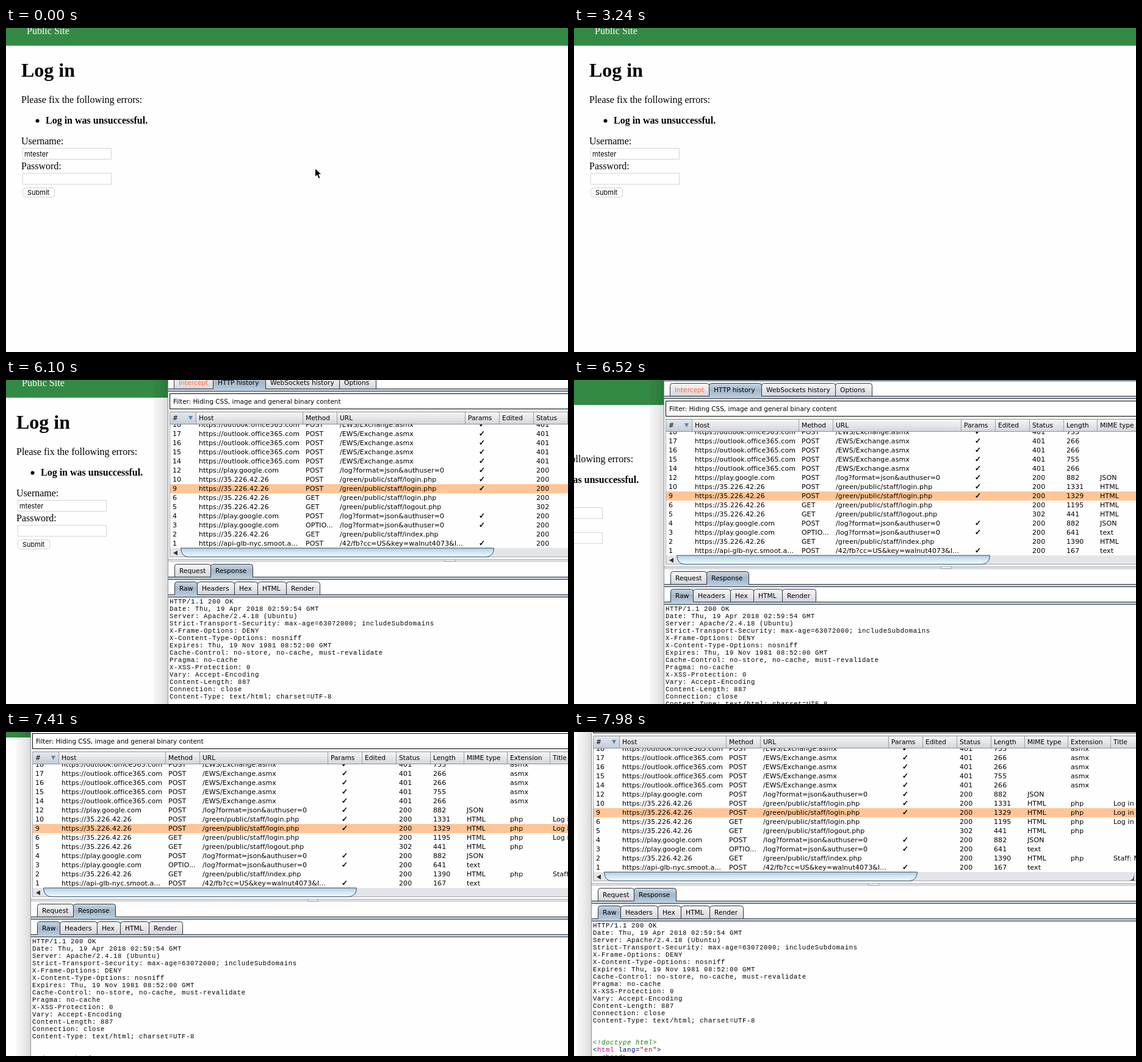
Animation of 921x532 px, one loop 8 s. Source, as an HTML page:

```html
<!DOCTYPE html>
<html lang="en">
<head>
<meta charset="utf-8">
<title>Log in</title>
<style>
  html, body { margin: 0; width: 100%; height: 100%; overflow: hidden; background: #fefefe; }
  svg { display: block; width: 921px; height: 532px; }
  text { white-space: pre; }
  .page { font: 16px "Liberation Serif", serif; }
  .bold { font-weight: bold; }
  .title { font-size: 32px; font-weight: bold; }
  .field { font: 11px Inter, sans-serif; }
  .label { font: 10.7px "DejaVu Sans", sans-serif; }
  .filter { font: 10.45px "DejaVu Sans", sans-serif; }
  .cell { font: 11px "DejaVu Sans", sans-serif; letter-spacing: .1px; }
  .check { font: 12px "DejaVu Sans", sans-serif; stroke: #000; stroke-width: .6px; }
  .code { font: 10.6px "Liberation Mono", monospace; letter-spacing: .64px; }
</style>
</head>
<body>
<svg viewBox="0 0 921 532">
  <defs>
    <linearGradient id="plain" x2="0" y2="1"><stop stop-color="#f7f7f8"/><stop offset="1" stop-color="#d3d5d9"/></linearGradient>
    <linearGradient id="active" x2="0" y2="1"><stop stop-color="#c9d6e2"/><stop offset=".5" stop-color="#a3b7ca"/><stop offset="1" stop-color="#b5c9db"/></linearGradient>
    <linearGradient id="thumb" x2="0" y2="1"><stop stop-color="#b3cde2"/><stop offset=".5" stop-color="#d5e7f5"/><stop offset="1" stop-color="#eefaff"/></linearGradient>
    <linearGradient id="shade"><stop stop-opacity=".03"/><stop offset=".5" stop-opacity=".07"/><stop offset="1" stop-opacity=".14"/></linearGradient>
    <clipPath id="rowArea"><rect x="276" y="73" width="1000" height="203"/></clipPath>
  </defs>
  <g id="world">
    <g id="page"></g>
    <g id="panel"></g>
  </g>
  <path id="cursor" d="M.5.5V14.6L3.8 11.6L6.3 17.3L9 16.1L6.5 10.6H11.2Z" stroke="#fff"/>
</svg>
<script>
const $ = id => document.getElementById(id);
const esc = s => String(s).replace(/&/g, "&amp;").replace(/</g, "&lt;");
const text = (x, y, s, cls, fill = "#000") => `<text x="${x}" y="${y}" class="${cls}" fill="${fill}">${esc(s)}</text>`;
const rect = (x, y, w, h, fill, more = "") => `<rect x="${x}" y="${y}" width="${w}" height="${h}" fill="${fill}" ${more}/>`;
const box = (x, y, w, h, fill, stroke, r = 0) => rect(x + .5, y + .5, w - 1, h - 1, fill, `stroke="${stroke}" rx="${r}"`);

$("page").innerHTML =
  rect(-10, -60, 1300, 89, "#338a45") +
  text(34, 10, "Public Site", "page", "#fff") +
  text(25, 80, "Log in", "page title") +
  text(25, 123, "Please fix the following errors:", "page") +
  `<circle cx="51.5" cy="152.5" r="3"/>` +
  text(65, 157, "Log in was unsuccessful.", "page bold") +
  text(25, 191, "Username:", "page") +
  box(27, 197, 146, 19, "#fff", "#d4d4d4") +
  text(30, 211, "mtester", "field") +
  text(25, 232, "Password:", "page") +
  box(27, 238, 146, 19, "#fff", "#d4d4d4") +
  box(27, 262, 53, 16, "#fff", "#d2d2d2", 3.5) +
  text(35, 274, "Submit", "field");

// Tabs: names, their edges, the top edge and the index of the open tab
function tabBar(names, edges, top, open) {
  const bottom = top + 22;
  const tabs = names.map((name, i) => {
    const l = edges[i] + .5, r = edges[i + 1] + .5, t = top + .5;
    const fill = i === open ? "url(#active)" : "url(#plain)";
    return `<path d="M${l} ${bottom}V${t + 4}Q${l} ${t} ${l + 4} ${t}H${r - 4}Q${r} ${t} ${r} ${t + 4}V${bottom}Z" fill="${fill}" stroke="#30343a"/>` +
      text(l + 7.5, top + 15, name, "label", name === "Intercept" ? "#ff6633" : "#000");
  });
  return tabs.join("") + strip(bottom - 1) +
    rect(edges[open] + 1, bottom - 1, edges[open + 1] - edges[open] - 1, 2, "#b5c9db");
}
const strip = y => rect(274, y, 1000, 5, "#bdd0e2") + rect(274, y, 1000, 1, "#30343a") + rect(274, y + 4, 1000, 1, "#30343a");

const columns = [["#", 281], ["Host", 324], ["Method", 499], ["URL", 555], ["Params", 765], ["Edited", 821],
  ["Status", 877], ["Length", 933], ["MIME type", 988], ["Extension", 1059], ["Title", 1129]];

const mail = "https://outlook.office365.com", play = "https://play.google.com", site = "https://35.226.42.26";
const exchange = "/EWS/Exchange.asmx", log = "/log?format=json&authuser=0", staff = "/green/public/staff/";
const mailRow = (n, length) => [n, mail, "POST", exchange, "✓", "", 401, length, "", "asmx"];
const siteRow = (n, method, file, check, status, length, title) =>
  [n, site, method, staff + file, check, "", status, length, "HTML", "php", title];
const rows = [
  mailRow(18, 755), mailRow(17, 266), mailRow(16, 266), mailRow(15, 755), mailRow(14, 266),
  [12, play, "POST", log, "✓", "", 200, 882, "JSON"],
  siteRow(10, "POST", "login.php", "✓", 200, 1331, "Log in"),
  siteRow(9, "POST", "login.php", "✓", 200, 1329, "Log in"),
  siteRow(6, "GET", "login.php", "", 200, 1195, "Log in"),
  siteRow(5, "GET", "logout.php", "", 302, 441),
  [4, play, "POST", log, "✓", "", 200, 882, "JSON"],
  [3, play, "OPTIO...", log, "✓", "", 200, 641, "text"],
  siteRow(2, "GET", "index.php", "", 200, 1390, "Staff: Menu"),
  [1, "https://api-glb-nyc.smoot.a...", "POST", "/42/fb?cc=US&key=walnut4073&l...", "✓", "", 200, 167, "text"],
];

function table() {
  let out = rect(276, 52, 1000, 21, "url(#plain)") + rect(276, 52, 1000, 1, "#8c9096") + rect(276, 72, 1000, 1, "#8c9096") +
    rect(276, 52, 1, 239, "#9a9ea4") + rect(277, 53, 42, 19, "#5c86b0", 'opacity=".12"') +
    `<path d="M307 59H314L310.500 66Z" fill="#5b86b3"/>`;
  columns.forEach(([name, x], i) => {
    out += text(x, 66, name, "label");
    if (i) out += rect(x - 5, 53, 1, 19, "#9a9ea4");
  });
  out += `<g clip-path="url(#rowArea)">` + rect(277, 171, 1000, 15, "#ffc596");
  rows.forEach((row, r) => row.forEach((value, c) => {
    const y = 77 + r * 15;
    if (value) out += value === "✓" ? text(783, y, value, "check") : text(columns[c][1], y, value, "cell");
  }));
  return out + `</g><g id="focus">${box(319, 171, 175, 15, "none", "#b98f6e")}</g>`;
}

const scrollBar = () =>
  rect(277, 276, 1000, 15, "#e3e5e8") + rect(277, 290, 1000, 1, "#a4a8ad") +
  `<path d="M289 280V288L282 284Z" fill="#333"/>
   <path d="M294.500 276Q295 290.500 308 290.500H795Q807.500 289 807.500 276Z" fill="url(#thumb)" stroke="#2f4f6c"/>
   <path d="M1156 290Q1163 288 1163 277V290Z" fill="#555"/>`;

const response = `HTTP/1.1 200 OK
Date: Thu, 19 Apr 2018 02:59:54 GMT
Server: Apache/2.4.18 (Ubuntu)
Strict-Transport-Security: max-age=63072000; includeSubdomains
X-Frame-Options: DENY
X-Content-Type-Options: nosniff
Expires: Thu, 19 Nov 1981 08:52:00 GMT
Cache-Control: no-store, no-cache, must-revalidate
Pragma: no-cache
X-XSS-Protection: 0
Vary: Accept-Encoding
Content-Length: 887
Connection: close
Content-Type: text/html; charset=UTF-8`.split("\n");

const span = (s, style) => `<tspan style="${style}">${esc(s)}</tspan>`;
const tag = name => span("<", "fill:#0000a0") + span(name, "fill:#c000a0");
const markup = [
  span("<!doctype html>", "fill:#008a00;font-style:italic"),
  tag("html") + span(" lang", "fill:#0000a0") + "=" + span('"en"', "fill:#c00000") + span(">", "fill:#0000a0"),
  "  " + tag("head") + span(">", "fill:#0000a0"),
];

$("panel").innerHTML =
  rect(250, -60, 23, 700, "url(#shade)") +
  rect(273, -60, 1000, 700, "#fefefe") + rect(273, -60, 1, 700, "#8b8f94") +
  strip(-15) +
  tabBar(["Intercept", "HTTP history", "WebSockets history", "Options"], [283, 347, 433, 554, 614], -7, 1) +
  box(276, 22, 1000, 26, "#fff", "#000") +
  text(282, 39, "Filter: Hiding CSS, image and general binary content", "filter") +
  table() + scrollBar() +
  rect(274, 294, 1000, 5, "#d9dbde") + rect(274, 294, 1000, 1, "#b4b7bb") +
  box(727, 294, 18, 4, "#f4f4f4", "#a2a5a9") +
  tabBar(["Request", "Response"], [284, 343, 412], 302, 1) +
  tabBar(["Raw", "Headers", "Hex", "HTML", "Render"], [284, 321, 382, 420, 467, 522], 331, 0) +
  response.map((line, i) => text(276, 367 + 12 * i, line, "code")).join("") +
  markup.map((line, i) => `<text x="276" y="${559 + 12 * i}" class="code">${line}</text>`).join("");

// Hard steps: [start ms, x, y]; an entry without a position hides the pointer
const pointer = [[0, 506, 230], [440, 452, 246], [587, 394, 263], [733, 325, 279], [880, 277, 289],
  [1180, 248, 262], [1330, 170, 215], [1480, 85, 180], [1620, 38, 152], [1770, 70, 130], [1910, 165, 137],
  [2060, 207, 184], [2210, 110, 166], [2360, 56, 140], [2505, 150, 133], [2650, 420, 210], [2795, 690, 310],
  [2940, 784, 350], [3240], [4590, 488, 10], [4740]];
const camera = [[0, 0, 0], [6100, 8, 0], [6230, 45, -3], [6380, 88, -8], [6520, 126, -12], [6670, 166, -11],
  [6815, 204, -4], [6960, 226, 5], [7260, 231, 13], [7410, 233, 20], [7550, 236, 28], [7695, 240, 36],
  [7840, 243, 42], [7980, 245, 46]];
const at = (steps, t) => steps.findLast(step => step[0] <= t);
const show = (id, on) => $(id).setAttribute("visibility", on ? "visible" : "hidden");

function draw() {
  const t = performance.now() % 8000;
  const [, px, py] = at(pointer, t), [, cx, cy] = at(camera, t);
  $("world").setAttribute("transform", `translate(${-cx} ${-cy})`);
  show("panel", t >= 4290);
  show("focus", t >= 4290 && t < 6100);
  show("cursor", px !== undefined);
  if (px !== undefined) $("cursor").setAttribute("transform", `translate(${px} ${py})`);
  requestAnimationFrame(draw);
}
draw();
</script>
</body>
</html>
```
